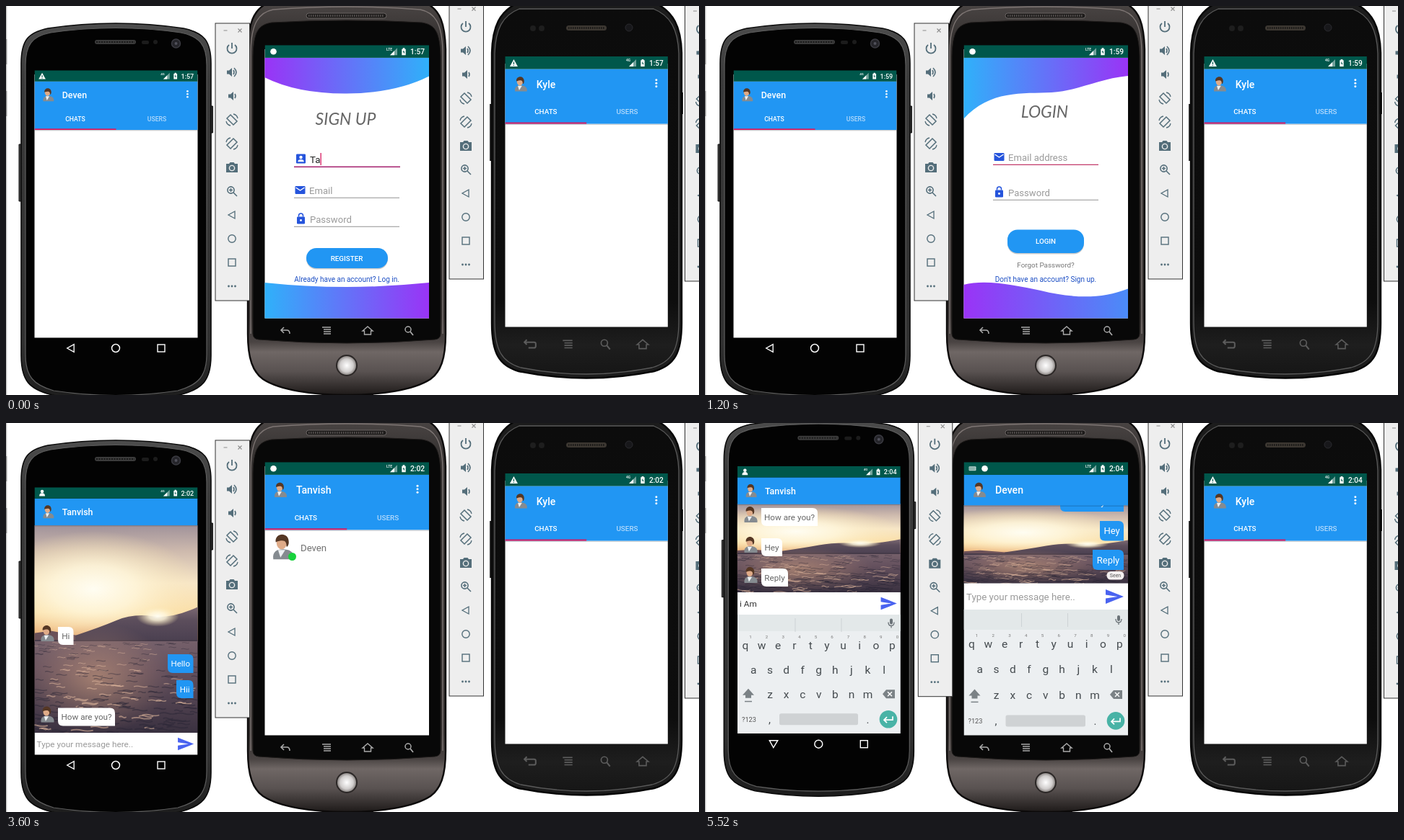
These frames come from a looping animation (960x540 px, 6 s). An HTML page:

```html
<!DOCTYPE html>
<html lang="en">
<head>
<meta charset="utf-8">
<title>Chat app on three phones</title>
<style>
html, body { margin: 0; width: 100%; height: 100%; overflow: hidden; background: #fff; }
#stage { display: block; width: 960px; height: 540px; }
text { font-family: Roboto, "Noto Sans", sans-serif; white-space: pre; }
.script { font-family: Lato, "Open Sans", sans-serif; font-style: italic; }
</style>
</head>
<body>
<svg id="stage" viewBox="0 0 960 540">
<defs>
  <linearGradient id="rim" x2="0" y2="1"><stop stop-color="#4c4c4c"/><stop offset=".15" stop-color="#3a3a3a"/><stop offset=".85" stop-color="#303030"/><stop offset="1" stop-color="#1c1c1c"/></linearGradient>
  <linearGradient id="shell" x2="0" y2="1"><stop stop-color="#4a4544"/><stop offset=".08" stop-color="#383433"/><stop offset=".8" stop-color="#35302f"/><stop offset=".865" stop-color="#4a4443"/><stop offset=".89" stop-color="#6f6765"/><stop offset=".94" stop-color="#595251"/><stop offset="1" stop-color="#1e1a19"/></linearGradient>
  <linearGradient id="front" x2="0" y2="1"><stop stop-color="#0c0c0c"/><stop offset=".8" stop-color="#0d0d0d"/><stop offset=".92" stop-color="#1e1e1e"/><stop offset="1" stop-color="#161616"/></linearGradient>
  <linearGradient id="cool"><stop stop-color="#2fb1fa"/><stop offset="1" stop-color="#9a33f6"/></linearGradient>
  <linearGradient id="warm"><stop stop-color="#9a33f6"/><stop offset="1" stop-color="#2fb1fa"/></linearGradient>
  <linearGradient id="dusk"><stop stop-color="#9a33f6"/><stop offset="1" stop-color="#4a8cf8"/></linearGradient>
  <linearGradient id="sky" x2="0" y2="1"><stop stop-color="#a0929a"/><stop offset=".22" stop-color="#cdb9ad"/><stop offset=".5" stop-color="#f7e6c8"/><stop offset=".75" stop-color="#fbdfa8"/><stop offset="1" stop-color="#e39c62"/></linearGradient>
  <linearGradient id="cloud" x2="0" y2="1"><stop stop-color="#7d6a73"/><stop offset=".4" stop-color="#5c4e5c"/><stop offset="1" stop-color="#4a3f50"/></linearGradient>
  <linearGradient id="sea" x2="0" y2="1"><stop stop-color="#75606a"/><stop offset=".3" stop-color="#65515e"/><stop offset="1" stop-color="#3a3140"/></linearGradient>
  <radialGradient id="sun"><stop stop-color="#fffdf2"/><stop offset=".4" stop-color="#fff6da" stop-opacity=".85"/><stop offset="1" stop-color="#fbe6b0" stop-opacity="0"/></radialGradient>
  <radialGradient id="gleam"><stop stop-color="#dba883" stop-opacity=".55"/><stop offset="1" stop-color="#c89478" stop-opacity="0"/></radialGradient>
  <radialGradient id="ball"><stop stop-color="#fff"/><stop offset=".7" stop-color="#d0cdcc"/><stop offset="1" stop-color="#8d8886"/></radialGradient>
</defs>
</svg>
<script>
const BLUE = '#2196f3', PINK = '#d81b60', INK = '#2554dc', GREY = '#9a9a9a';
const LEFT = 'Deven', MIDDLE = 'Tanvish', RIGHT = 'Kyle';

// Shape helpers, all returning markup
const rect = (x, y, w, h, fill, r = 0, more = '') =>
  `<rect x="${x}" y="${y}" width="${w}" height="${h}" fill="${fill}" rx="${r}" ${more}/>`;
const circ = (x, y, r, fill, line = 'none', lw = 1) =>
  `<circle cx="${x}" cy="${y}" r="${r}" fill="${fill}" stroke="${line}" stroke-width="${lw}"/>`;
const oval = (x, y, rx, ry, fill) => `<ellipse cx="${x}" cy="${y}" rx="${rx}" ry="${ry}" fill="${fill}"/>`;
const path = (d, fill = 'none', line = 'none', lw = 1, more = '') =>
  `<path d="${d}" fill="${fill}" stroke="${line}" stroke-width="${lw}" ${more}/>`;
const at = (x, y, s, body) => `<g transform="translate(${x} ${y}) scale(${s})">${body}</g>`;
const text = (x, mid, str, size, fill, anchor = 'start', weight = 400, cls = '') =>
  `<text x="${x}" y="${mid + size * .36}" font-size="${size}" fill="${fill}" text-anchor="${anchor}" font-weight="${weight}" class="${cls}">${str}</text>`;
const view = (x, y, w, h, body) =>
  `<svg x="${x}" y="${y}" width="${w}" height="${h}" viewBox="${x} ${y} ${w} ${h}">${body}</svg>`;

// Icons centred on the origin
const icon = {
  power: c => path('M-4-5A6.5 6.5 0 1 0 4-5M0-8V0', 'none', c, 1.8),
  louder: c => path('M-7-2.5H-4L0-6V6L-4 2.5H-7Z', c) + path('M2-3Q4 0 2 3M3-6Q9 0 3 6', 'none', c, 1.6),
  softer: c => path('M-5-2.5H-2L2-6V6L-2 2.5H-5Z', c) + path('M4-3Q6 0 4 3', 'none', c, 1.6),
  turn: c => path('M-7-2L-2-7 7 2 2 7Z', 'none', c, 1.5) + path('M2-8Q7-7 8-2M-2 8Q-7 7-8 2', 'none', c, 1.3),
  camera: c => path('M-8-5H-4L-2.5-7H2.5L4-5H8V7H-8Z', c) + circ(0, 1, 3.6, c, '#eee', 1.4),
  zoom: c => circ(-1.5, -1.5, 4.6, 'none', c, 1.6) + path('M2 2L7 7M-4-1.5H1M-1.5-4V1', 'none', c, 1.5),
  back: c => path('M4-5V5L-5 0Z', 'none', c, 1.3),
  home: c => circ(0, 0, 5.2, 'none', c, 1.4),
  recent: c => rect(-5, -5, 10, 10, 'none', 0, `stroke="${c}" stroke-width="1.4"`),
  dots: c => [-4.5, 0, 4.5].map(x => circ(x, 0, 1.4, c)).join(''),
  undo: c => path('M-6-1H2Q6-1 6 4M-2-5L-6-1 -2 3', 'none', c, 1.6),
  loop: c => path('M-7-3H5Q7-3 7-1V2Q7 4 5 4H-2M-4-6L-7-3 -4 0', 'none', c, 1.8),
  list: c => path('M-6-5H6M-4-2H6M-4 1H6M-4 4H6', 'none', c, 1.4),
  house: c => path('M-7 0L0-6 7 0H4.5V5H-4.5V0Z', 'none', c, 1.4),
  lens: c => circ(-1, -2, 4, 'none', c, 1.5) + path('M2 1L6 6', 'none', c, 1.8),
  warn: () => path('M0-5L5.5 5H-5.5Z', '#fff') + path('M0-1.5V2M0 3V4', 'none', '#00574b', 1.2),
  dot: () => circ(0, 0, 4.3, '#fff'),
  person: () => circ(0, -2.5, 2.6, '#fff') + path('M-4.5 5Q-4.5 0 0 0T4.5 5Z', '#fff'),
  keys: () => rect(-5, -3, 10, 6, '#b5cfcb', 1) + path('M-4-1H4M-4 1H4', 'none', '#00574b', .9, 'stroke-dasharray="1 1"'),
  signal: () => path('M-5 5H5V-5Z', '#fff', 'none', 1, 'opacity=".45"') + path('M-5 5H1V-1Z', '#fff'),
  battery: () => path('M-3-4H-1.5V-5.5H1.5V-4H3V5.5H-3Z', '#fff') + path('M.5-3L-1.5 1H0V4L1.5 0H0Z', '#00574b'),
  mail: () => rect(-7, -5.5, 14, 11, INK, 1.3) + path('M-6-3.5L0 .5 6-3.5', 'none', '#fff', 1.3),
  lock: () => rect(-5.5, -3, 11, 10, INK, 1.3) + path('M-3-3V-4.5A3 3 0 0 1 3-4.5V-3', 'none', INK, 1.5) + circ(0, 2, 1.4, '#fff'),
  badge: () => rect(-6.5, -6.5, 13, 13, INK, 1.3) + circ(0, -2, 2.2, '#fff') + path('M-4.3 4.3Q-4 1 0 1T4.3 4.3Z', '#fff'),
  mic: () => rect(-2, -6, 4, 8, '#6b7378', 2) + path('M-4-1Q-4 4 0 4T4-1M0 4V7', 'none', '#6b7378', 1.3),
  send: () => path('M-12.5-10L12.5 0-12.5 10V2.5L4 0-12.5-2.5Z', '#4a63f0'),
  face: () => path('M-8 10.5C-9 4-5 2 0 2S10 4 9 10.5Z', '#858b90') + path('M-4 2.5L-2 9 2 2.5Z', '#eef1f3') +
    oval(-1, -3.5, 4.3, 5.5, '#dfab88') + path('M-6-4C-7-12 5-13 5-4 5-1 3 1 3-1 3-4 2-7-6-4Z', '#553724'),
};
const put = (name, x, y, s = 1, c) => at(x, y, s, icon[name](c));

// Emulator tool strip
const tools = ['power', 'louder', 'softer', 'turn', 'turn', 'camera', 'zoom', 'back', 'home', 'recent', 'dots'];
function strip(x, y) {
  const c = '#546e7a';
  return at(x, y, 1, rect(.5, .5, 47.5, 385, '#eeeeee', 0, 'stroke="#333"') +
    path('M12 10.5H17M32 8L37 13M37 8L32 13', 'none', '#8a8a8a', 1.1) +
    tools.map((n, i) => at(23.5, 35.5 + 33 * i, i == 4 ? '-1 1' : 1, icon[n](c))).join(''));
}

// Phone bodies
const phoneA = path('M18 192H24V271H18ZM281 139H286.5V176H281Z', '#3c3c3c', '#111') +
  path('M21 80C21 48 30 37 58 31Q152 17 246 31C274 37 284 48 284 80V485C284 520 272 532 240 540Q152 555 64 540C32 532 21 520 21 485Z', 'url(#rim)', '#0a0a0a', 1.6) +
  path('M27 82C27 54 36 42 62 37Q152 24 242 37C268 42 278 54 278 82V484C278 514 266 526 238 534Q152 547 66 534C38 526 27 514 27 484Z', '#030303', '#5e5e5e', 1.2) +
  rect(123, 47, 57, 6, '#3b3b3b', 3) + path('M125 50H178', 'none', '#191919', 2, 'stroke-dasharray="2 1.5"') +
  rect(188, 48, 10, 5, '#1c1c1c', 2) + circ(207, 50, 3, '#1c1c1c') + circ(235.5, 52, 6, '#25252a', '#3b3b42', 1.5) + circ(235.5, 52, 2, '#50505a') +
  put('home', 152, 475, 1.05, '#fff') + put('recent', 215, 475, 1, '#fff');
const phoneB = path('M335 60C336 25 342 6 362-4H582C602 6 608 25 609 60V455C609 490 602 508 588 518C565 533 520 540 472 540S379 533 356 518C342 508 335 490 335 455Z', 'url(#shell)', '#0c0a0a', 2.4) +
  path('M339 455V62C340 24 350 9 370 5Q472-3 574 5C594 9 604 24 605 62V455', 'none', '#7d7573', 1.4) +
  path('M342 70C343 35 350 26 368 23Q472 17 576 23C594 26 601 35 602 70V455Q602 462 594 463Q472 473 350 463Q342 462 342 455Z', '#080808', '#1d1a19') +
  rect(416, 10, 111, 7, '#1d1b1a', 3.5, 'stroke="#6c6665"') + path('M419 13.5H524', 'none', '#55504f', 3, 'stroke-dasharray="1.5 1.5"') +
  circ(472, 499, 15, '#2b2726') + circ(472, 499, 13, 'url(#ball)') +
  ['undo', 'list', 'house', 'lens'].map((n, i) => put(n, 387 + 57 * i, 451, 1, '#a9a9a9')).join('');
const phoneC = path('M670 136H676V215H670ZM932 120H938V150H932Z', '#2c2c2c') +
  path('M673 65C674 28 684 8 708-4H900C924 8 935 28 936 65V440C936 482 926 499 898 507Q804 526 710 507C683 499 673 482 673 440Z', '#1c1c1c', '#050505', 2.4) +
  path('M677 66C678 32 688 13 711 4H897C920 13 931 32 932 66V438C932 478 922 494 895 502Q804 520 713 502C687 494 677 478 677 438Z', 'url(#front)', '#5a5a5a', 1.3) +
  rect(776, 27, 56, 7, '#3d3832', 3.5) + path('M779 30.5H829', 'none', '#1c1a18', 3, 'stroke-dasharray="1.5 1.5"') +
  circ(730, 31, 4, '#1e1e1e') + circ(742, 31, 4, '#1e1e1e') + circ(863, 30, 5, '#18181b', '#2b2b2f') +
  ['loop', 'list', 'lens', 'house'].map((n, i) => put(n, 726 + 52 * i, 470, 1.12, '#5c5c5c')).join('');

// App parts
function status(w, time, icons, net) {
  return rect(0, 0, w, 17.6, '#00574b') + icons.map((n, i) => put(n, 12 + 17 * i, 9)).join('') +
    text(w - 55, 5.5, net, 5, '#fff', 'middle', 500) + put('signal', w - 49, 9) + put('battery', w - 35, 9, .9) +
    text(w - 6, 9.3, time, 10.2, '#fff', 'end', 500);
}
function header(x, y, width, k, { time, icons = [], net = '4G', name, tabs }) {
  const w = width / k, end = tabs ? 94 : 60;
  let s = rect(0, end, w, 1.5, '#000', 0, 'opacity=".18"') + rect(0, 17.5, w, end - 17.5, BLUE) + status(w, time, icons, net) +
    put('face', 21.5, 38.5, .98) + text(43.5, 39, name, 14.1, '#fff', 'start', 500);
  if (tabs) s += [-4.5, 0, 4.5].map(d => circ(w - 16, 37.5 + d, 1.5, '#fff')).join('') +
    text(w / 4, 77, 'CHATS', 9.9, '#fff', 'middle', 500) + text(w * .75, 77, 'USERS', 9.9, '#b4dafb', 'middle', 500) +
    rect(0, 92, w / 2, 2, PINK);
  return at(x, y, k, s);
}

function photo(x, y, w, h, hz) {
  let seed = 7;
  const rnd = () => (seed = seed * 16807 % 2147483647) / 2147483647;
  const sea = h - hz, rise = hz * .3;
  let waves = '';
  for (let i = 0; i < 240; i++) {
    const d = rnd() ** 1.3, wy = hz + 2 + d * sea, wx = rnd() * w, len = 5 + 11 * d * rnd();
    const glint = rnd() < .5 - Math.abs(wx / w - .4) * .6;
    waves += path(`M${wx - len} ${wy}q${len / 2} ${-1 - d} ${len} 0t${len} 0`, 'none', glint ? '#dcb59c' : '#2b2736',
      .7 + d * sea / 100, `opacity="${glint ? .6 : .5}"`);
  }
  return `<svg x="${x}" y="${y}" width="${w}" height="${h}">` + rect(0, 0, w, hz, 'url(#sky)') +
    oval(w * .36, hz * .55, w * .65, hz * .5, 'url(#sun)') +
    path(`M0 ${hz}V${hz * .93}L${w * .1} ${hz * .91} ${w * .3} ${hz * .96} ${w * .5} ${hz}Z`, '#6a5058') +
    path(`M${w * .25} ${hz * .95}Q${w * .4} ${hz * .88} ${w * .5} ${hz - rise * .6}T${w * .72} ${hz - rise * .72}T${w} ${hz - rise}V${hz}H${w * .25}Z`, 'url(#cloud)') +
    oval(w * .75, hz - rise * .72, w * .13, hz * .09, 'url(#sun)') +
    rect(0, hz - 2, w, 3, '#463b49') + rect(0, hz, w, sea, 'url(#sea)') +
    oval(w * .38, hz + sea * .4, w * .45, sea * .6, 'url(#gleam)') + waves + '</svg>';
}

function bubble(x, y, w, h, str, size, mine) {
  const r = 7, d = mine
    ? `M${x + r} ${y}H${x + w - r}Q${x + w} ${y} ${x + w} ${y + r}V${y + h}H${x + r}Q${x} ${y + h} ${x} ${y + h - r}V${y}Z`
    : `M${x} ${y}H${x + w - r}Q${x + w} ${y} ${x + w} ${y + r}V${y + h}H${x + r}Q${x} ${y + h} ${x} ${y + h - r}Z`;
  return path(d, mine ? BLUE : '#fff') + text(x + w / 2, y + h / 2, str, size, mine ? '#fff' : '#666', 'middle');
}
const receipt = str => rect(556.5, 206, 24, 11.5, '#f4f0f0', 5.5) + text(568.5, 211.6, str, 7, '#555', 'middle');
const entry = (x, y, w, h, str, k, color = GREY) => rect(x, y, w, h, '#fff') +
  text(x + 3.5 * k, y + h / 2, str, 13.3 * k, color) + put('send', x + w - 18.5 * k, y + h / 2, k);

function keyboard(x, y, w, h, row, gap) {
  const c = '#454b4f', p = w / 10, line = i => row + gap * i;
  const keys = (str, dx, i) => [...str].map((ch, n) => text(x + dx + p * n, line(i), ch, 15.5, c, 'middle')).join('');
  const low = line(3), r = x + w;
  return rect(x, y, w, h, '#eceff1') + rect(x, y, w, row - 19 - y, '#e3e8e9') +
    path(`M${x + 80} ${y + 5}v19M${x + 144} ${y + 5}v19`, 'none', '#cdd3d5') + put('mic', r - 13, (y + row - 19) / 2) +
    [...'1234567890'].map((n, i) => text(x + 18 + p * i, row - 11, n, 6.2, '#777', 'middle')).join('') +
    keys('qwertyuiop', 11, 0) + keys('asdfghjkl', 22.3, 1) + keys('zxcvbnm', 45, 2) +
    at(x + 15, line(2), 1, path('M0-8L8 1H4V5H-4V1H-8Z', '#7b8286') + rect(-5, 9, 10, 1.5, '#7b8286')) +
    at(r - 16, line(2) - .5, 1, path('M-9 0L-4-6H8V6H-4Z', '#7b8286') + path('M-2-3L4 3M4-3L-2 3', 'none', '#fff', 1.4)) +
    text(x + 16, low, '?123', 9.2, '#555', 'middle') + text(x + 44.5, low, ',', 15, c, 'middle') +
    rect(x + 58, low - 8, w - 117, 16, '#cfd2d4', 2.5) + text(r - 45.5, low, '.', 15, c, 'middle') +
    circ(r - 17, low, 12.3, '#49b3a6') + at(r - 17, low, 1, path('M6-4V1H-5M-2-3L-6 1-2 5', 'none', '#fff', 1.7));
}

const field = (y, name, str, line = '#a5a5a5', dx = 0) => put(name, 407.5 + dx, y - .5) +
  text(420 + dx, y, str, 13.1, GREY) + rect(399, y + 9.7, 146, 1.2, line);
const button = (x, y, w, h, str) => rect(x, y + 1.5, w, h, '#000', 14, 'opacity=".2"') + rect(x, y, w, h, BLUE, 14) +
  text(472, y + h / 2, str, 9.8, '#fff', 'middle', 500);
const link = str => text(472, 379.5, str, 10, '#1d4fc4', 'middle');
const title = str => text(470.5, 157, str, 23, '#666', 'middle', 400, 'script');

// Screens of the left phone
const panelA = rect(39, 95, 228, 370, '#fff');
const headA = (time, icons, name, tabs) => header(39.5, 89.3, 226, .88, { time, icons, name, tabs });
const homeA = (time, icons) => panelA + headA(time, icons, LEFT, true);
const shade = rect(39, 89, 228, 372, '#656565') + rect(39, 89, 228, 16, '#07241f') + rect(39, 104, 228, 67, '#0e3b61') +
  rect(44, 92, 216.5, 34.5, '#37434a') + text(54, 101.5, '2:01 AM', 9, '#fff', 'start', 700) +
  text(54, 114.5, 'Friday, December 13', 8.9, '#c3cacd') + put('signal', 211, 107) + put('battery', 225, 107, .9) +
  circ(241.5, 107.5, 7, '#20b7cf') + at(241.5, 107.5, .85, circ(0, -2, 2.3, '#24343b') + path('M-4.5 4.5Q-4 1 0 1T4.5 4.5Z', '#24343b')) +
  rect(44, 136, 216.5, 41, '#fafafa') + circ(64.5, 156.5, 12.5, '#9c9c9c') + put('person', 64.5, 156.5, 1.25) +
  text(84, 150, 'New Message', 10.6, '#222') + text(84, 162.5, MIDDLE + ': Hi', 8.9, '#777') + text(255, 151, '2:01 AM', 8, '#777', 'end') +
  `<g opacity=".55">${put('face', 62, 193, 1.4)}</g>` + circ(72, 204, 5, '#0b7d20') + text(83, 194.5, MIDDLE, 11.7, '#3c3c3c') +
  path('M240 190.5H250M242 194.5H253M245 198.5H255', 'none', '#fff', 2.4);
const said = (x, y, w, h, str) => put('face', x - 15, y + 9, 1.05) + bubble(x, y, w, h, str, 11.7, false);
const chatA = photo(39, 142, 228, 288, 161) + said(72, 283, 21.5, 25, 'Hi') + bubble(224, 321, 35.5, 26, 'Hello', 11.5, true) +
  bubble(236, 357, 23.5, 25, 'Hii', 11.5, true) + said(72, 395.5, 79, 25, 'How are you?') +
  entry(39.5, 430, 226, 31, 'Type your message here..', .885) + headA('2:02', ['person'], MIDDLE);
const replyA = photo(44, 112, 228, 123, 70) + said(78, 118, 78, 25, 'How are you?') + said(78, 160, 29, 25, 'Hey') + said(78, 202, 37, 25, 'Reply') +
  entry(45, 235, 226, 31, 'i Am', .885, '#333') + keyboard(45, 266, 226, 165, 308, 34.4) +
  at(5.3, -29.3, 1, headA('2:04', ['person'], MIDDLE));

// Screens of the middle phone
const panelB = rect(358, 60, 229, 375, '#fff');
const headB = (time, icons, name, tabs) => header(358.5, 54.3, 227.5, 1, { time, icons, net: 'LTE', name, tabs });
const statB = time => at(358.5, 54.3, 1, status(227.5, time, ['dot'], 'LTE'));
const signUp = panelB + path('M358 72H587V97Q540 121 472 121.5T358 99Z', 'url(#warm)') +
  path('M358 384Q472 396 587 384V435H358Z', 'url(#cool)') + statB('1:57') + title('SIGN UP') +
  put('badge', 408.5, 212) + text(421, 213, MIDDLE.slice(0, 2), 13.3, '#222') + rect(435.5, 204, 1.3, 17, PINK) + rect(399, 222.5, 147, 1.6, '#a82a74') +
  field(256, 'mail', 'Email') + field(296, 'lock', 'Password', '#a5a5a5', 1) + button(416, 336, 113, 28, 'REGISTER') +
  link('Already have an account? Log in.');
const login = panelB + path('M358 72H587V97C545 101 520 117 480 120C440 122 395 116 358 157Z', 'url(#cool)') +
  path('M358 387C390 379 430 388 465 395C510 406 550 407 587 392V435H358Z', 'url(#dusk)') + statB('1:59') +
  at(0, -10, 1, title('LOGIN')) + field(210, 'mail', 'Email address', '#bf2f62') + field(259, 'lock', 'Password') +
  button(419, 310.5, 106, 32.5, 'LOGIN') + text(472, 359, 'Forgot Password?', 9.9, '#777', 'middle') + link("Don't have an account? Sign up.");
const chatB = (time, talk, caret = '') => photo(358, 114, 229, 109, 69) + talk + entry(358.5, 222.5, 227.5, 37, 'Type your message here..', 1) + caret +
  keyboard(358.5, 259, 227.5, 175, 306, 35.8) + headB(time, ['keys', 'dot'], LEFT);
const homeB = panelB + headB('2:02', ['dot'], MIDDLE, true) +
  put('face', 383.5, 172, 1.65) + circ(396.5, 185.5, 5.5, '#18d23c') + text(408, 173.5, LEFT, 13.2, '#707070');

const steps = [
  { time: '1:57', a: homeA('1:57', ['warn']), b: signUp },
  { time: '1:59', a: homeA('1:59', []), b: login },
  { time: '2:01', a: shade, b: chatB('2:01', bubble(557, 175.5, 23.5, 28.5, 'Hi', 13, true) + receipt('Sent'), rect(362, 232, 1.5, 17, '#8c3f50')) },
  { time: '2:02', a: chatA, b: homeB },
  { time: '2:04', a: replyA, shift: [5.3, -29.3],
    b: chatB('2:04', bubble(492, 95, 88, 28, 'How are you?', 13, true) + bubble(547, 136, 33, 27.5, 'Hey', 13, true) +
      bubble(537, 176, 43, 28, 'Reply', 13, true) + receipt('Seen')) },
];

function scene({ time, a, b, shift = [0, 0] }) {
  const [dx, dy] = shift;
  const back = dy ? path('M84 470H95.5L89.5 480Z', 'none', '#fff', 1.4) : put('back', 90, 475, 1.05, '#fff');
  return '<g display="none">' + at(dx, dy, 1, phoneA + back) + phoneB + phoneC +
    view(39.5 + dx, 89.3 + dy, 226, 371.2, a) + view(358.5, 54.3, 227.5, 379.2, b) +
    rect(691.5, 80, 225.3, 365.5, '#fff') + header(691.5, 70, 225.3, .995, { time, icons: ['warn'], name: RIGHT, tabs: true }) +
    strip(289.5 + dx, 23.5 + dy) + strip(613.5, -6.5) + strip(940, -3.5) + '</g>';
}

const stage = document.getElementById('stage');
stage.insertAdjacentHTML('beforeend', rect(0, 0, 960, 540, '#fff') + rect(0, 0, 1.3, 540, '#c4c4c4') +
  rect(0, 46, 1.3, 35, '#8d8d8d') + rect(0, 118, 1.3, 35, '#8d8d8d') + steps.map(scene).join(''));
const scenes = [...stage.children].filter(el => el.tagName === 'g');

const HOLD = 1200, start = performance.now();
let shown = -1;
function tick() {
  const now = Math.floor((performance.now() - start) / HOLD) % steps.length;
  if (now !== shown) scenes.forEach((el, i) => el.setAttribute('display', i === now ? 'inline' : 'none'));
  shown = now;
  requestAnimationFrame(tick);
}
tick();
</script>
</body>
</html>
```
